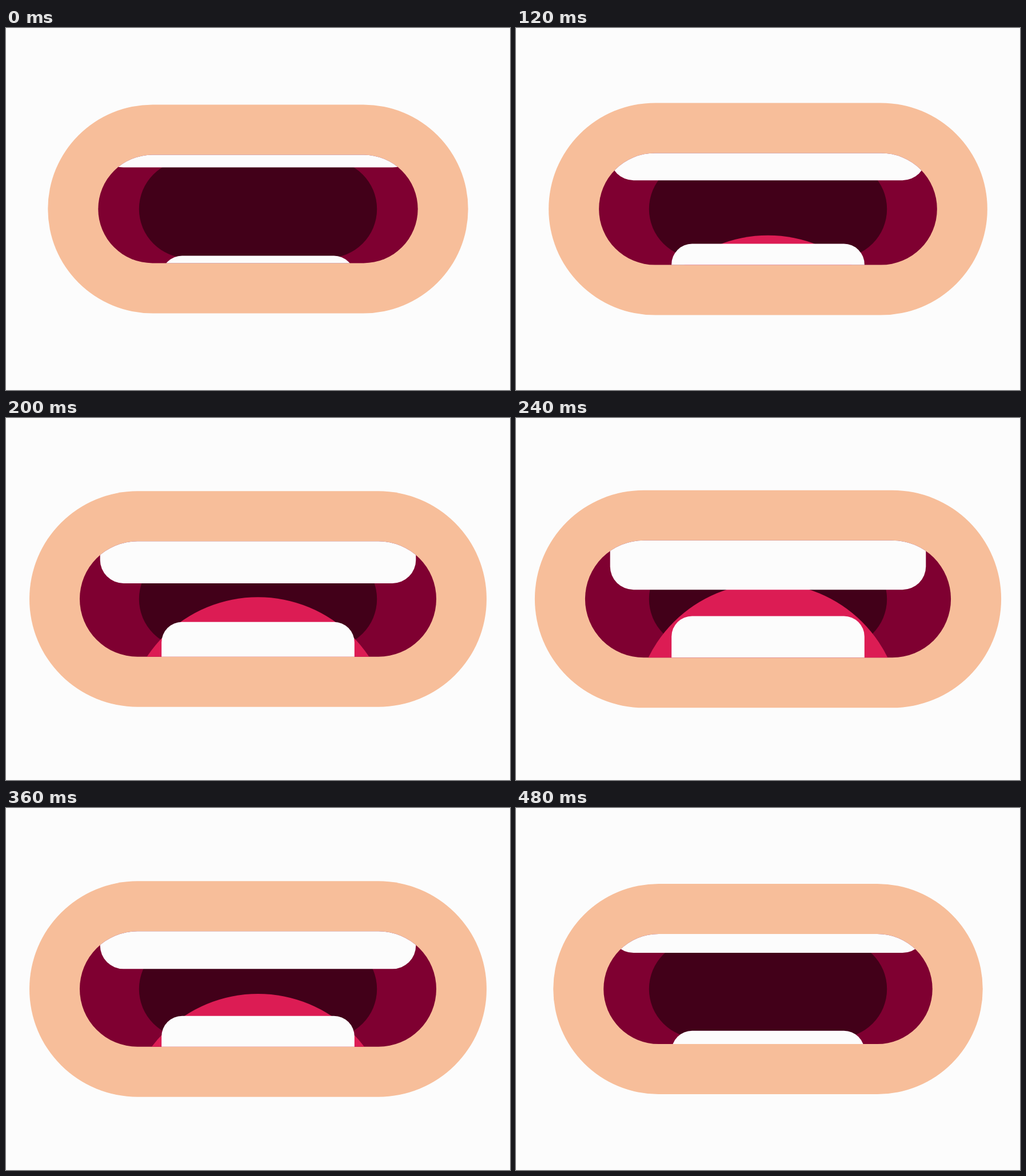
These frames come from a looping animation (882x635 px, 0.52 s). An HTML page with a canvas:

```html
<!DOCTYPE html>
<html lang="en">
<head>
<meta charset="utf-8">
<title>Talking mouth</title>
<style>
  html, body { margin: 0; height: 100%; overflow: hidden; background: #fcfcfc; }
  canvas { display: block; }
</style>
</head>
<body>
<canvas id="stage" width="882" height="635"></canvas>
<script>
const ctx = document.getElementById('stage').getContext('2d');
const CX = 441, CY = 317.5;
const LOOP = 520, STEP = 40, STEPS = 12, LIP = 88;
const WHITE = '#fcfcfc';

// Rounded box centred on CX
function box(halfWidth, top, bottom, radius, color) {
  ctx.beginPath();
  ctx.roundRect(CX - halfWidth, top, halfWidth * 2, bottom - top, radius);
  ctx.fillStyle = color;
  ctx.fill();
}

function pill(halfWidth, halfHeight, color) {
  box(halfWidth, CY - halfHeight, CY + halfHeight, halfHeight, color);
}

function draw(k) {
  const stretch = Math.min(k, STEPS - k);
  const bite = Math.min(k / 5, 1, (STEPS - k) / 6);
  const tongueTop = Math.max(413.2 - 24.75 * k, 102 + 28 * k);
  const halfWidth = 367.7 + 8.08 * stretch;
  const halfHeight = 182.9 + 1.58 * stretch;

  ctx.fillStyle = WHITE;
  ctx.fillRect(0, 0, 882, 635);
  pill(halfWidth, halfHeight, '#f7be9a');

  ctx.save();
  pill(halfWidth - LIP, halfHeight - LIP, '#7f0031');
  ctx.clip();
  pill(208.2, 86, '#420019');
  box(233, tongueTop, tongueTop + 466, 233, '#dc1c54');
  box(168.8, 399.4 - 52 * bite, 600, 36, WHITE);
  box(276.3, 100, 244.6 + 56.6 * bite, 41, WHITE);
  ctx.restore();
}

// The closed pose is held for two steps
function tick() {
  const t = performance.now() % LOOP;
  draw(Math.max(0, Math.floor(t / STEP) - 1));
  requestAnimationFrame(tick);
}
tick();
</script>
</body>
</html>
```
